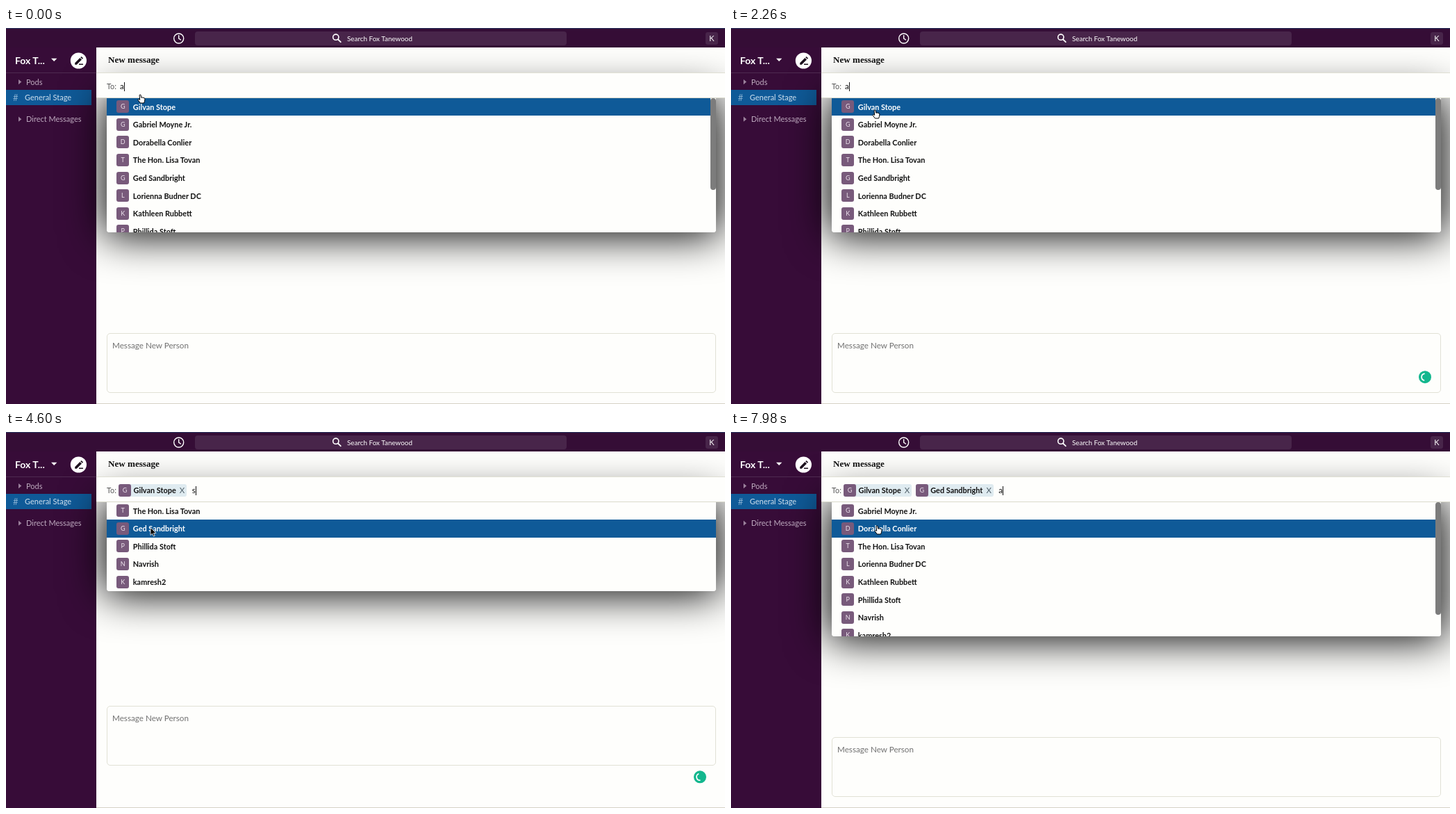
An HTML page for the animation above (8 s loop, 1035x541 px).

```html
<!DOCTYPE html>
<html lang="en">
<head>
<meta charset="utf-8">
<title>New message</title>
<style>
html, body { margin: 0; width: 100%; height: 100%; overflow: hidden; }
#stage { position: relative; width: 1035px; height: 541px; overflow: hidden; background: #fefefc; font: 11px/16px Lato, sans-serif; color: #111; }
#stage div, #stage svg { position: absolute; box-sizing: border-box; white-space: nowrap; }
#stage svg { overflow: visible; }
#top { left: 0; top: 0; width: 1035px; height: 28px; background: #350d36; border-top: 1.5px solid #2c3a62; }
#side { left: 0; top: 28px; width: 130px; height: 513px; background: #370c38; }
#find { left: 272px; top: 5px; width: 535px; height: 20px; border-radius: 4px; background: #48254a; }
#me { left: 1007px; top: 6px; width: 18px; height: 18px; border-radius: 3px; background: #48254a; color: #fff; line-height: 18px; text-align: center; }
#room { left: 0; top: 89px; width: 123px; height: 22px; background: #0f5a98; }
#toRow { left: 130px; top: 65px; width: 905px; height: 36px; background: #fefefc; border-bottom: 1px solid #d9d9cc; }
#line { left: 130px; top: 64px; width: 905px; height: 1px; background: #dfdfd3; }
#base { left: 130px; top: 540px; width: 905px; height: 1px; background: #d6d1c6; }
#menu { left: 145px; top: 100.5px; width: 877px; border-radius: 0 0 4px 4px; box-shadow: 0 0 60px 5px #000; }
#list { left: 0; top: 0; width: 877px; height: 100%; overflow: hidden; background: #fefefc; border-radius: 0 0 4px 4px; }
#thumb { left: 869px; top: 0; width: 8px; border-radius: 4px; background: #7c7c7c; }
#stage .row { left: 0; height: 25.6px; line-height: 25.6px; font-weight: 700; font-size: 10.9px; padding-left: 37.8px; }
#stage .row.on { background: #0f5a98; color: #fff; }
#stage .row .ava { position: absolute; left: 14.2px; top: 3.8px; }
.ava { width: 18px; height: 18px; border-radius: 3px; background: #785a7b; color: #eee4ee; font: 400 9px/18px Lato, sans-serif; text-align: center; display: block; }
#to { left: 162px; top: 75px; height: 18px; display: flex; align-items: center; }
.chip { display: flex; height: 18px; line-height: 18px; margin-right: 5.5px; padding-right: 3px; border-radius: 3px; background: #dfebf0; font-weight: 700; font-size: 10.9px; }
.chip b { margin: 0 5px 0 3.5px; }
.chip i { font: 400 11.5px/18px Lato, sans-serif; color: #4f5f68; }
#typed { margin-left: 2px; font-size: 11.5px; line-height: 18px; }
#caret { width: 1px; height: 13px; background: #111; }
#box { left: 145px; width: 877px; height: 86px; border: 1px solid #e1e1d5; border-radius: 5px; }
</style>
</head>
<body>
<div id="stage">
  <div id="top"></div>
  <div id="side"></div>
  <div id="find"></div>
  <div id="me">K</div>
  <div id="room"></div>
  <div id="box"></div>
  <div id="menu"><div id="list"></div><div id="thumb"></div></div>
  <div id="toRow"></div>
  <div id="line"></div>
  <div id="base"></div>
  <div id="to"></div>
  <svg width="1035" height="541" style="left:0;top:0">
    <g fill="none" stroke="#fff" stroke-width="1.4" stroke-linecap="round">
      <circle cx="248.7" cy="15" r="7"/>
      <path d="M248.7 10.8V15.2L251.6 17"/>
      <circle cx="474.8" cy="13.2" r="4.1" stroke-width="1.6"/>
      <path d="M478 16.5L481.8 20.2" stroke-width="1.8"/>
    </g>
    <path d="M0 64.5H130" stroke="#4e2a50"/>
    <path d="M65 43.8H73.4L69.2 48Z" fill="#fff"/>
    <circle cx="104.4" cy="47" r="11.6" fill="#fff"/>
    <path d="M99.2 50.2L106.4 43L109 45.6L101.8 52.8H99.2ZM107.2 42.2L108.5 40.9L111.1 43.5L109.8 44.8ZM105 53V51.6H111V53Z" fill="#1c111d"/>
    <path d="M18 74L22.4 77.6L18 81.2ZM18 127.6L22.4 131.2L18 134.8Z" fill="#9a809b"/>
    <g id="spin">
      <circle r="9" fill="#13b78e"/>
      <path id="arc" d="M4.9 0A4.9 4.9 0 0 1 -4.24 2.45" fill="none" stroke="#fff" stroke-width="1.7" stroke-linecap="round"/>
    </g>
    <path id="arrow" d="M0 0V11L2.6 8.7L4.4 12.6L6.2 11.8L4.5 8H8Z" fill="#000" stroke="#fff" stroke-width=".8"/>
    <path id="hand" d="M-.9 .9C-.9 -.4 1.1 -.4 1.2 .9L1.8 4.2C3.5 3.6 6.6 4.2 7 6L6.5 9.2L5.6 12H.4L-2.9 7.6C-3.2 6.4 -1.8 6 -.3 7.4Z" fill="#fff" stroke="#000" stroke-width="1"/>
  </svg>
</div>
<script>
const $ = id => document.getElementById(id);
const stage = $("stage");
const LOOP = 8000, ROW = 25.6, MENU_MAX = 193.4, BLINK = 1000;
const PICK1 = 2740, TYPE1 = 3200, PICK2 = 6700, TYPE2 = 6880;
const LOW = 439, HIGH = 394;

const people = ["Gilvan Stope", "Gabriel Moyne Jr.", "Dorabella Conlier", "The Hon. Lisa Tovan", "Ged Sandbright",
  "Lorienna Budner DC", "Kathleen Rubbett", "Phillida Stoft", "Navrish", "kamresh2"];
const first = people[0], second = people[4];

function label(text, x, y, size, color, extra = "") {
  const d = document.createElement("div");
  d.textContent = text;
  d.style.cssText = `left:${x}px;top:${y - 10}px;line-height:20px;font-size:${size}px;color:${color};${extra}`;
  stage.insertBefore(d, stage.querySelector("#stage > svg"));
  return d;
}
label("Search Fox Tanewood", 491, 15, 9.9, "#fff");
label("Fox T...", 13, 47, 14, "#fff", "font-weight:700");
label("Pods", 29, 78, 11, "#bda9be");
label("#", 10, 100, 13, "#86b0d2");
label("General Stage", 27, 100, 11, "#cfe0ee");
label("Direct Messages", 29, 131.3, 11, "#bda9be");
label("New message", 147, 46, 13.1, "#111", "font-family:'Liberation Serif',serif;font-weight:700");
label("To:", 145, 84, 10.8, "#555");
const hint = label("Message New Person", 153, 0, 11.7, "#717171");

const avatar = name => `<span class="ava">${name[0].toUpperCase()}</span>`;
const chip = name => `<span class="chip">${avatar(name)}<b>${name}</b><i>X</i></span>`;

function stateAt(t) {
  if (t < PICK1) return { chips: [], query: "a", hot: t < 400 || t >= 1100 ? 0 : -1, boxY: LOW };
  if (t < TYPE1) return { chips: [first], query: "", hot: -1, boxY: HIGH };
  if (t < PICK2) return { chips: [first], query: "s", hot: t < 4500 ? 0 : 1, boxY: HIGH };
  if (t < TYPE2) return { chips: [first, second], query: "", hot: -1, boxY: HIGH };
  return { chips: [first, second], query: "a", hot: 1, boxY: LOW };
}

let shown = "";
function layout(s) {
  const key = JSON.stringify(s);
  if (key === shown) return;
  shown = key;
  const found = people.filter(p => !s.chips.includes(p) && p.toLowerCase().includes(s.query));
  const long = found.length * ROW > MENU_MAX;
  $("menu").style.display = s.query ? "block" : "none";
  $("menu").style.height = Math.min(MENU_MAX, found.length * ROW) + "px";
  $("list").innerHTML = found.map((p, i) =>
    `<div class="row${i === s.hot ? " on" : ""}" style="top:${i * ROW}px;width:${long ? 869 : 877}px">${avatar(p)}${p}</div>`).join("");
  $("thumb").style.display = long ? "block" : "none";
  $("thumb").style.height = MENU_MAX ** 2 / (ROW * (found.length + 1)) + "px";
  $("to").innerHTML = s.chips.map(chip).join("") + `<span id="typed">${s.query}</span><span id="caret"></span>`;
  $("box").style.top = s.boxY - .5 + "px";
  hint.style.top = s.boxY + 6.7 + "px";
}

// time, x, y of the pointer tip
const path = [[0, 193, 96], [250, 193, 96], [500, 184, 112], [820, 184, 114], [1050, 184, 114], [1450, 207, 118],
  [2900, 207, 118], [3300, 208, 118], [4300, 208, 118], [4700, 208, 141], [6900, 208, 141], [7300, 210, 135], [8000, 210, 135]];
function pointerAt(t) {
  const i = path.findIndex(p => p[0] > t);
  const [a, b] = [path[i - 1], path[i]];
  const u = (t - a[0]) / (b[0] - a[0]), e = u * u * (3 - 2 * u);
  return [a[1] + (b[1] - a[1]) * e, a[2] + (b[2] - a[2]) * e];
}

const show = (el, on) => { el.style.visibility = on ? "visible" : "hidden"; };

function render(t) {
  layout(stateAt(t));

  const since = t >= TYPE2 ? TYPE2 : t >= TYPE1 ? TYPE1 : t >= PICK1 ? PICK1 : -220;
  show($("caret"), (t - since) % BLINK < BLINK / 2);

  const [x, y] = pointerAt(t);
  const hidden = (t >= TYPE1 && t < 3400) || (t >= TYPE2 && t < 7300);
  const isHand = t < 400 || (t >= 1100 && t < TYPE1) || t >= 7300;
  for (const [el, on] of [[$("hand"), isHand], [$("arrow"), !isHand]]) {
    el.setAttribute("transform", `translate(${x} ${y})`);
    show(el, on && !hidden);
  }

  // the badge follows the message box late
  const settled = t >= 5400;
  const spinY = t < PICK1 ? 502.2 : settled ? 457 : 496.3;
  const turn = settled ? 125 + (t - 5740) * 1.07 : 15 + (t - 3520) * 1.07;
  $("spin").setAttribute("transform", `translate(999 ${spinY})`);
  $("arc").setAttribute("transform", `rotate(${turn})`);
  show($("spin"), t >= 500 && t < 5800);
}

const start = performance.now();
function tick() {
  render((performance.now() - start) % LOOP);
  requestAnimationFrame(tick);
}
tick();
</script>
</body>
</html>
```
